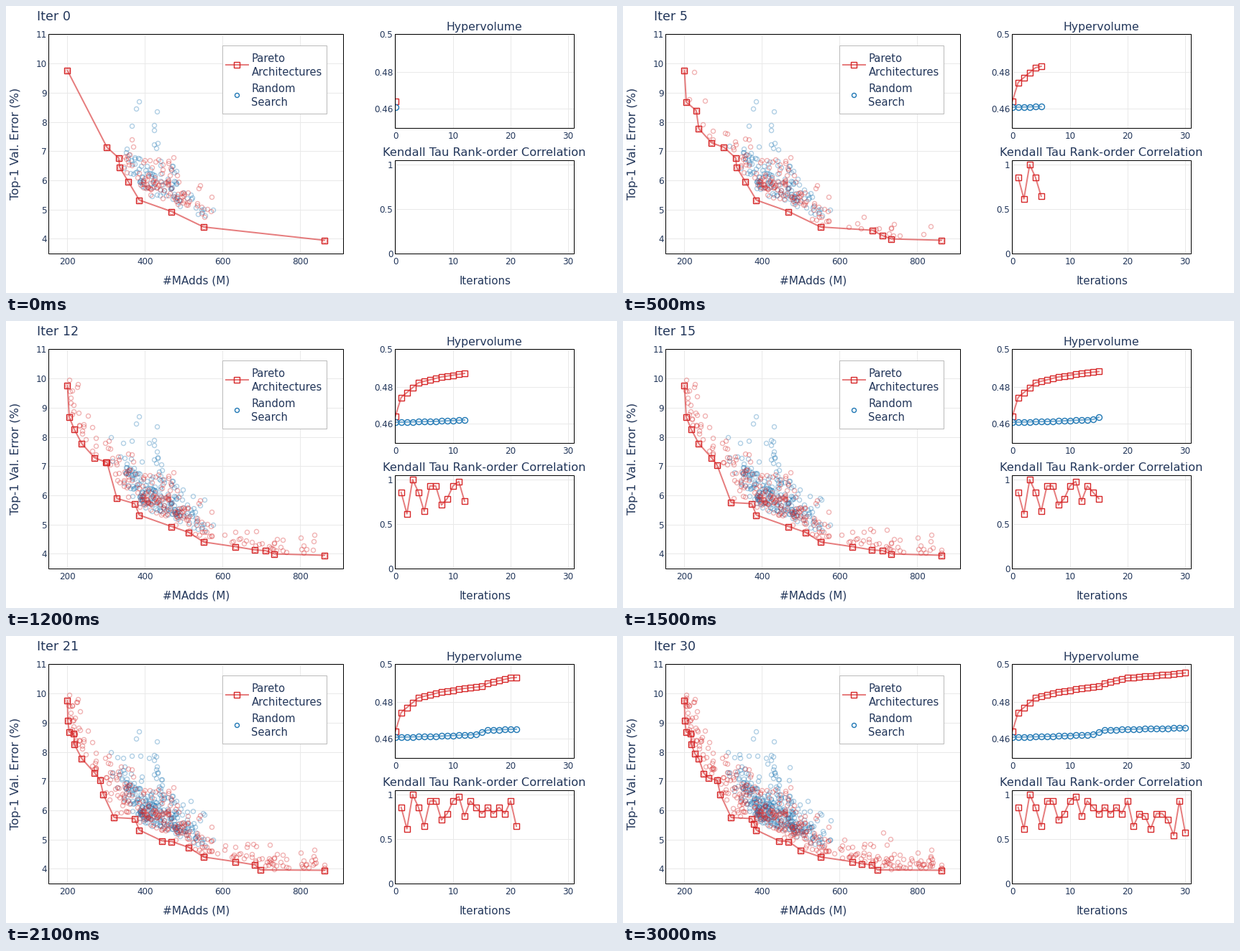
A matplotlib script that plays this animation: 850 by 400 pixels, repeating every 3500 ms.

```python
import numpy as np
import matplotlib.pyplot as plt
from matplotlib.animation import FuncAnimation
from matplotlib.patches import Rectangle

W, H, DPI = 850, 400, 100
PT = 72 / DPI  # points per stage pixel
RED, BLUE, INK, GRID = "#d62728", "#1f77b4", "#22365a", "#e9e9e9"
LAST, STEPS = 30, 35
FIRST_BATCH, BATCH = 100, 8

plt.rcParams["font.family"] = "DejaVu Sans"
fig = plt.figure(figsize=(W / DPI, H / DPI), dpi=DPI, facecolor="white")
ax = fig.add_axes([0, 0, 1, 1])
ax.set_xlim(0, W)
ax.set_ylim(H, 0)
ax.axis("off")

# Key architectures in stage pixels: the first front, then finds in order
START = [(85.5, 90), (140.5, 197), (157, 212), (158, 224.5), (170, 244.5),
         (185.5, 270.5), (230.5, 286.5), (275, 308), (443, 326.5)]
FINDS = [(385.5, 320), (88, 134), (105.5, 171), (361, 320), (95, 151),
         (179, 254.5), (319, 314.5), (346.5, 319), (131, 201), (150.5, 253),
         (94.5, 136), (217, 285.5), (135.5, 221), (354, 326), (86, 118),
         (119.5, 198), (182.5, 261.5), (332, 317.5), (100, 164),
         (112.5, 191.5), (247.5, 298.5)]


def elite_rows(seed):
    """(birth, x, y) of key points; each find has a weaker forerunner."""
    rng = np.random.default_rng(seed)
    rows = [(0, x, y) for x, y in START]
    for birth, (x, y) in zip(np.linspace(1, LAST, len(FINDS)).round(), FINDS):
        rows.append((birth, x, y))
        rows.append((rng.integers(1, birth + 1),
                     x * (1 + rng.uniform(0.02, 0.1)),
                     y - 1100 / x * rng.uniform(0.3, 1)))
    return rows


def front_at(rows, k):
    """Non-dominated points known at iteration k, from left to right."""
    best, lowest = [], -1
    for x, y in sorted((x, y) for birth, x, y in rows if birth <= k):
        if y > lowest:
            best.append((x, y))
            lowest = y
    return np.array(best)


elite = elite_rows(5)
fronts = [front_at(elite, k) for k in range(LAST + 1)]


def cloud_point(rng, k):
    """A random architecture: a skewed cloud with a few strays far above."""
    x = rng.triangular(*((155, 205, 292) if k == 0 else (138, 195, 297)))
    floor = np.interp(x, [140, 165, 185, 230, 275, 300],
                      [212, 240, 262, 280, 299, 306])
    gap = rng.gamma(2.6, 11.5 - 3 * (x > 235))
    return x, floor - 2 - gap * (2.2 if rng.random() < 0.06 else 1)


def offspring(rng, k):
    """A searched architecture: just above the front of its time."""
    if k == 0:
        x, y = cloud_point(rng, k)
    else:
        fx, fy = fronts[k - 1].T
        walk = np.r_[0, np.cumsum(np.hypot(np.diff(fx), 0.6 * np.diff(fy)))]
        s = rng.uniform(0, walk[-1])
        x = min(np.interp(s, walk, fx) + rng.exponential(5), 444)
        spread = 6 + 10 * np.exp(-((x - 195) / 45) ** 2)
        y = np.interp(s, walk, fy) - rng.gamma(2, spread)
    return x, np.clip(y, 82, np.interp(x, *fronts[k].T) - 3)


def population(seed, draw):
    rng = np.random.default_rng(seed)
    return [(k, *draw(rng, k)) for k in range(LAST + 1)
            for _ in range(BATCH if k else FIRST_BATCH)]


reds = np.array(elite + population(7, offspring))
blues = np.array(population(11, cloud_point))

# Search quality per iteration
steps = np.arange(LAST + 1)
hv_search = np.interp(steps, [0, 1, 4, 8, 12, 15, 16, 20, 30],
                      [.4642, .4742, .4821, .4852, .4871, .4881, .4898,
                       .4927, .4954])
hv_random = np.interp(steps, [0, 7, 14, 16, 30],
                      [.4609, .4614, .4624, .4648, .4660])
# Rank correlation of eight samples drops by 1/14 for each swapped pair
SWAPS = [2, 5.4, 0, 2, 5, 1, 1, 4, 3, 1, 0.3, 3.4, 1, 2, 3,
         2, 3, 2, 3, 1, 5, 3, 3.4, 5.4, 3, 3, 4, 6.4, 1, 6]
tau_search = 1 - np.array(SWAPS) / 14


def iter_x(k):
    return 541.7 + 8.015 * k


def hv_y(v):
    return 39.5 + (0.5 - v) * 2600


def tau_y(v):
    return 344.8 - 123.8 * v


def text(x, y, s, size, ha="center", va="baseline", **kw):
    return ax.text(x, y, s, fontsize=size * PT, color=INK, ha=ha, va=va,
                   zorder=9, **kw)


def panel(x0, y0, x1, y1, xticks, yticks):
    """Grid, frame and tick labels; ticks are (position, label) pairs."""
    for x, label in xticks:
        ax.plot([x, x], [y0, y1], color=GRID, lw=PT, zorder=1)
        text(x, y1 + 15, label, 12)
    for y, label in yticks:
        ax.plot([x0, x1], [y, y], color=GRID, lw=PT, zorder=1)
        text(x0 - 3, y + 5, label, 12, "right")
    box = Rectangle((x0, y0), x1 - x0, y1 - y0, fill=False, ec="black",
                    lw=PT, zorder=6)
    return ax.add_patch(box)


def markers(shape, size, color, alpha=1.0, z=4):
    return ax.plot([], [], shape, ms=size * PT, mfc="none", mec=color,
                   mew=1.4 * PT, alpha=alpha, zorder=z)[0]


def trace(shape, color, z=4, clip=None):
    """A translucent line with solid open markers."""
    line = ax.plot([], [], color=color, lw=2 * PT, alpha=0.6, zorder=z)[0]
    parts = line, markers(shape, 8, color, z=z + 0.1)
    if clip:
        for part in parts:
            part.set_clip_path(clip)
    return parts


def fill(parts, x, y):
    for part in parts:
        part.set_data(x, y)


iters = [(iter_x(k), str(k)) for k in range(0, 31, 10)]
panel(59.5, 39, 469, 345,
      [(85.5 + 0.5393 * (m - 200), str(m)) for m in range(200, 801, 200)],
      [(39.5 + 40.67 * (11 - e), str(e)) for e in range(4, 12)])
hv_box = panel(541.5, 39, 790.5, 170, iters,
               [(hv_y(v), f"{v:g}") for v in (0.46, 0.48, 0.5)])
tau_box = panel(541.5, 215, 790.5, 345, iters,
                [(tau_y(v), f"{v:g}") for v in (0, 0.5, 1)])

title = text(43, 20, "", 17.5, "left")
text(665.5, 34, "Hypervolume", 15.8)
text(665.5, 209, "Kendall Tau Rank-order Correlation", 16.3)
text(265, 388, "#MAdds (M)", 15.2)
text(666, 388, "Iterations", 15.1)
text(21, 191.5, "Top-1 Val. Error (%)", 16.3, "right", "center", rotation=90)

# Legend
ax.add_patch(Rectangle((301.5, 55), 145, 95, fc="white", ec="#bbbbbb",
                       lw=PT, zorder=7))
key_line, key_square = trace("s", RED, z=8)
key_line.set_data([306, 337], [82, 82])
key_square.set_data([321.5], [81.5])
markers("o", 6, BLUE, z=8).set_data([321.5], [123.5])
for y, word in zip((78, 97, 120, 139),
                   ("Pareto", "Architectures", "Random", "Search")):
    text(341.5, y, word, 14.8, "left")

blue_dots = markers("o", 6, BLUE, 0.35, z=2)
red_dots = markers("o", 6, RED, 0.35, z=2.1)
front = trace("s", RED)
hv_red = trace("s", RED, clip=hv_box)
hv_blue = trace("o", BLUE, clip=hv_box)
tau = trace("s", RED, clip=tau_box)


def update(i):
    k = min(i, LAST)
    title.set_text(f"Iter {k}")
    for dots, pop in ((blue_dots, blues), (red_dots, reds)):
        born = pop[pop[:, 0] <= k]
        dots.set_data(born[:, 1], born[:, 2])
    fill(front, *fronts[k].T)
    x = iter_x(steps[:k + 1])
    fill(hv_red, x, hv_y(hv_search[:k + 1]))
    fill(hv_blue, x, hv_y(hv_random[:k + 1]))
    fill(tau, x[1:], tau_y(tau_search[:k]))
    return []


anim = FuncAnimation(fig, update, frames=STEPS, interval=100,
                     init_func=lambda: update(0), repeat=True, repeat_delay=0)
plt.show()
```
